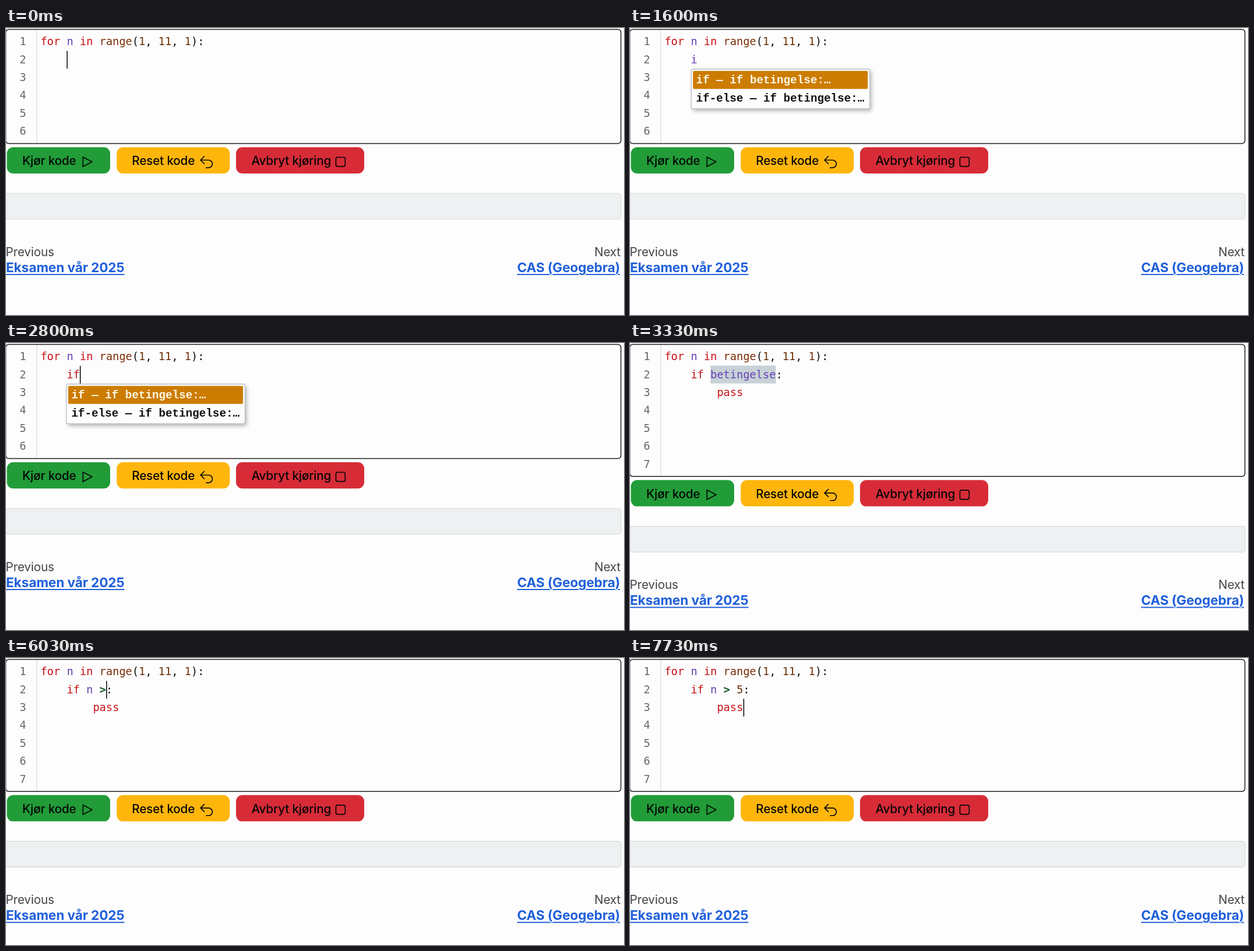
Animation, 1080 px wide and 503 px high, one loop 8 s. Source, as an HTML page with a canvas:

```html
<!DOCTYPE html>
<html lang="no">
<head>
<meta charset="utf-8">
<title>Code editor</title>
<style>
html, body { margin: 0; width: 100%; height: 100%; overflow: hidden; background: #fdfdfd; }
canvas { display: block; width: 1080px; height: 503px; }
</style>
</head>
<body>
<canvas id="stage" width="1080" height="503"></canvas>
<script>
const ctx = document.getElementById('stage').getContext('2d');
const LOOP = 8000;
const PAGE = '#fdfdfd', INK = '#111';
const CODE = '19px "DejaVu Sans Mono", monospace';
const MENU = 'bold 19.6px "Liberation Mono", monospace';
const UI = '21px Inter, sans-serif';
const LABEL = '450 21px Inter, sans-serif';
const LINK = '700 23px Inter, sans-serif';
const COL = 11.44, ROW = 31.35, LEFT = 60.4, BASE = 30.4;

const FIRST = 'for n in range(1, 11, 1):';
const PASS = '        pass';

// at: start time, line: second line, cur: [row, column], menu: popup x
const steps = [
  { at: 0, line: '', cur: [1, 4] },
  { at: 470, line: '' },
  { at: 800, line: '', cur: [1, 4] },
  { at: 970, line: 'i', cur: [1, 5] },
  { at: 1070, line: 'i', cur: [1, 5], menu: 107 },
  { at: 1600, line: 'i', menu: 107 },
  { at: 1770, line: 'if', cur: [1, 6], menu: 105.7 },
  { at: 2270, line: 'if', menu: 105.7 },
  { at: 2800, line: 'if', cur: [1, 6], menu: 105.7 },
  { at: 3330, line: 'if betingelse:', body: true, select: [7, 17] },
  { at: 4900, line: 'if n:', body: true, cur: [1, 8] },
  { at: 5070, line: 'if n :', body: true, cur: [1, 9] },
  { at: 5570, line: 'if n :', body: true },
  { at: 6030, line: 'if n >:', body: true, cur: [1, 10] },
  { at: 6130, line: 'if n > :', body: true, cur: [1, 11] },
  { at: 6670, line: 'if n > :', body: true },
  { at: 6970, line: 'if n > 5:', body: true, cur: [1, 12] },
  { at: 7470, line: 'if n > 5:', body: true },
  { at: 7730, line: 'if n > 5:', body: true, cur: [2, 12] }
];

function text(str, x, y, font, color, align = 'left', spacing = 0) {
  ctx.font = font;
  ctx.fillStyle = color;
  ctx.textAlign = align;
  ctx.letterSpacing = spacing + 'px';
  ctx.fillText(str, x, y);
}

function box(x, y, w, h, r, fill, stroke, width = 1) {
  ctx.beginPath();
  ctx.roundRect(x, y, w, h, r);
  if (fill) { ctx.fillStyle = fill; ctx.fill(); }
  if (stroke) { ctx.strokeStyle = stroke; ctx.lineWidth = width; ctx.stroke(); }
}

function tokenColor(word) {
  if (/^(for|in|if|pass)$/.test(word)) return '#c9141a';
  if (word === 'range') return '#7a320c';
  if (/^\d/.test(word)) return '#6e300a';
  if (/^[a-z]/.test(word)) return '#6642b8';
  if (word === '>') return '#14582a';
  return INK;
}

function codeLine(str, row) {
  for (const m of str.matchAll(/[a-z]+|\d+|[^\s]/g)) {
    const font = m[0] === '>' ? 'bold ' + CODE : CODE;
    text(m[0], LEFT + m.index * COL, BASE + row * ROW, font, tokenColor(m[0]));
  }
}

function editor(s) {
  const rows = s.body ? 7 : 6;
  const h = 11.9 + rows * ROW;
  ctx.fillStyle = '#dcdcdc';
  ctx.fillRect(53, 4, 1.3, h - 3);
  box(-0.4, 2.5, 1075, h, 5, null, '#1b1b1b', 1.5);
  for (let i = 0; i < rows; i++) {
    text(i + 1, 29.5, BASE + i * ROW, CODE, '#686868', 'center');
  }
  if (s.select) {
    const [a, b] = s.select;
    ctx.fillStyle = '#c8d2d6';
    ctx.fillRect(LEFT + a * COL, 39.5, (b - a) * COL, ROW);
  }
  codeLine(FIRST, 0);
  codeLine('    ' + s.line, 1);
  if (s.body) codeLine(PASS, 2);
  if (s.cur) {
    const [row, col] = s.cur;
    ctx.fillStyle = '#000';
    ctx.fillRect(Math.round(LEFT + col * COL), 8.8 + row * ROW, 1.5, 31);
  }
}

function button(x, w, color, label, labelX) {
  box(x, 209, w, 46, 11, color);
  text(label, labelX, 240.3, LABEL, '#050505', 'left', -0.15);
}

function icons() {
  ctx.strokeStyle = '#050505';
  ctx.lineWidth = 1.7;
  ctx.lineCap = ctx.lineJoin = 'round';
  ctx.beginPath();
  ctx.moveTo(134.5, 226.2);
  ctx.lineTo(150.5, 234.6);
  ctx.lineTo(134.5, 243);
  ctx.closePath();
  ctx.moveTo(346.5, 225);
  ctx.lineTo(340, 231.5);
  ctx.lineTo(346.5, 238);
  ctx.moveTo(340, 231.5);
  ctx.lineTo(354, 231.5);
  ctx.arc(354, 238.2, 6.7, -Math.PI / 2, Math.PI / 2);
  ctx.lineTo(350, 244.9);
  ctx.stroke();
  box(576.5, 226.5, 16.2, 16.2, 3, null, '#050505', 1.7);
}

// The halo in page colour breaks the underline around descenders.
function link(str, x, align) {
  const color = '#1f5fdb', y = 428;
  ctx.font = LINK;
  ctx.letterSpacing = '-0.1px';
  ctx.textAlign = align;
  const w = ctx.measureText(str).width;
  ctx.fillStyle = color;
  ctx.fillRect(align === 'right' ? x - w : x, 431, w, 2);
  ctx.strokeStyle = PAGE;
  ctx.lineWidth = 3;
  ctx.strokeText(str, x, y);
  text(str, x, y, LINK, color, align, -0.1);
}

function lowerPage() {
  button(1.5, 180.5, '#219c38', 'Kjør kode', 28.5);
  button(193.5, 197.5, '#ffb60c', 'Reset kode', 220);
  button(402, 224, '#d72c38', 'Avbryt kjøring', 429);
  icons();
  box(-0.5, 290, 1075.3, 45, 4, '#eff0f1', '#d0d9d9', 1.1);
  text('Previous', -0.5, 399.5, UI, '#444', 'left', -0.15);
  text('Next', 1074, 399.5, UI, '#444', 'right', -0.15);
  link('Eksamen vår 2025', 0, 'left');
  link('CAS (Geogebra)', 1073, 'right');
}

function menu(x) {
  ctx.save();
  ctx.shadowColor = 'rgba(0, 0, 0, 0.28)';
  ctx.shadowBlur = 7;
  ctx.shadowOffsetX = 3;
  ctx.shadowOffsetY = 4;
  box(x, 72, 312, 69.5, 3, '#fdfdfd');
  ctx.restore();
  box(x, 72, 312, 69.5, 3, null, '#bebebe', 1.3);
  box(x + 3, 75.3, 305.5, 31.4, 2, '#cc7c00');
  text('if — if betingelse:…', x + 8.5, 97, MENU, '#fdf6e6');
  text('if-else — if betingelse:…', x + 8.5, 128.5, MENU, INK);
}

function draw(t) {
  const s = steps.findLast(step => step.at <= t);
  ctx.fillStyle = PAGE;
  ctx.fillRect(0, 0, 1080, 503);
  editor(s);
  ctx.save();
  if (s.body) ctx.translate(0, ROW);
  lowerPage();
  ctx.restore();
  if (s.menu) menu(s.menu);
}

const start = performance.now();
function tick() {
  draw((performance.now() - start) % LOOP);
  requestAnimationFrame(tick);
}
tick();
</script>
</body>
</html>
```
